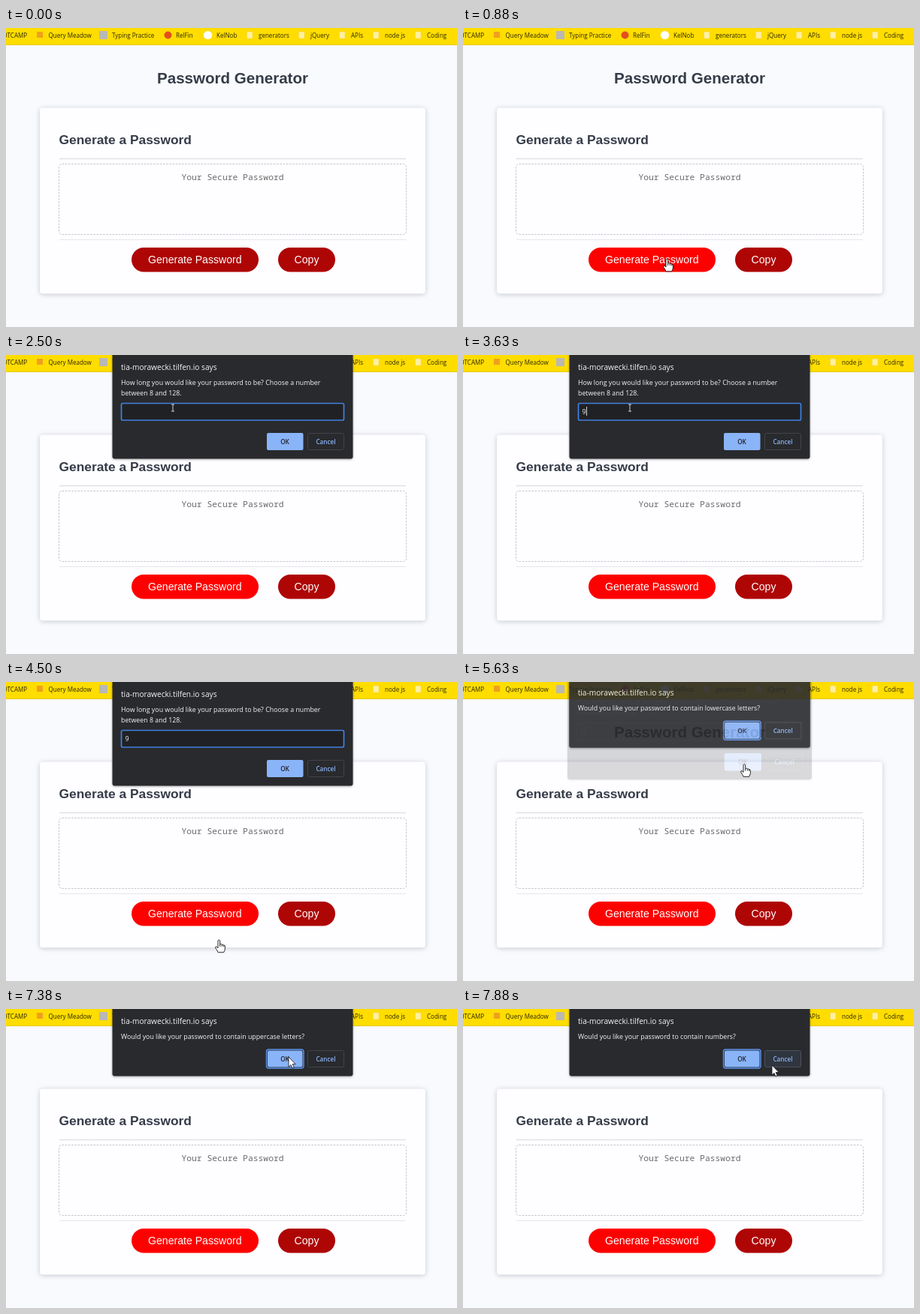
These frames come from a looping animation (600x399 px, 8 s). An HTML page:

```html
<!DOCTYPE html>
<html lang="en">
<head>
<meta charset="utf-8">
<title>Password Generator</title>
<style>
html, body { margin: 0; width: 100%; height: 100%; overflow: hidden; background: #f8fafd; }
svg { display: block; width: 600px; height: 399px; }
text { font-family: "Open Sans", "Noto Sans", sans-serif; white-space: pre; }
.bar text { font-size: 8.05px; fill: #2b2600; }
.page text { font-family: "Liberation Sans", Arial, sans-serif; fill: #353c49; font-weight: bold; }
.page .btn { font-size: 14.1px; font-weight: normal; fill: #fff; text-anchor: middle; }
.page .hint { font: 11.35px "Noto Sans Mono", monospace; fill: #6b6b6b; text-anchor: middle; }
.card { fill: #fefdff; filter: drop-shadow(0 1px 3px rgba(60, 70, 90, .28)); }
.red { fill: #ae0505; }
.red.hover { fill: #fd0000; }
.dialog text { font-size: 8.82px; fill: #f4f5f7; }
.dialog .head { font-size: 10.14px; }
.dialog .ok, .dialog .no { font-size: 8.2px; font-weight: 600; text-anchor: middle; }
.dialog .ok { fill: #202124; }
.dialog .no { fill: #8ab4f8; }
.panel { fill: #292a2d; filter: drop-shadow(0 1px 1.5px rgba(0, 0, 0, .35)); }
.cancel { fill: #292a2d; stroke: #414449; }
.cancel.hover { fill: #30363f; stroke: #4a515c; }
</style>
</head>
<body>
<svg viewBox="0 0 600 399">
  <rect width="600" height="399" fill="#f8fafd"/>
  <g class="bar" id="bar">
    <rect width="600" height="22" fill="#ffdd00"/>
    <rect y="22" width="600" height="1" fill="#e8c81c"/>
    <rect x="41" y="5" width="8" height="8" fill="#f0a01c"/>
    <rect x="124" y="4" width="11" height="11" fill="#b9b8b4"/>
    <circle cx="215.5" cy="9.5" r="5" fill="#e2501f"/>
    <circle cx="268.5" cy="9.5" r="5.6" fill="#fff"/>
  </g>
  <g class="page">
    <text x="301.5" y="74" font-size="20.55" text-anchor="middle">Password Generator</text>
    <rect class="card" x="45" y="106.5" width="513" height="248" rx="4"/>
    <text x="70.5" y="155" font-size="17.35">Generate a Password</text>
    <path d="M71 174.5H532" stroke="#dfe1e8" stroke-width="1.6"/>
    <path d="M71 282.5H532" stroke="#e6e8ee"/>
    <rect x="70.5" y="181.5" width="462" height="94" rx="4" fill="none" stroke="#c2c6d0" stroke-dasharray="2.6 1.6"/>
    <text class="hint" x="301.5" y="203">Your Secure Password</text>
    <rect class="red" id="generate" x="167" y="293" width="169" height="32.5" rx="16.2"/>
    <text class="btn" x="251.3" y="313.5">Generate Password</text>
    <rect class="red" x="362" y="293" width="76" height="32.5" rx="16.2"/>
    <text class="btn" x="400" y="313.5">Copy</text>
  </g>
  <g id="dialogs"></g>
  <g id="cursor" stroke-linejoin="round">
    <path id="arrow" d="M0 0V13.2L3 10.5L5 15L7.2 14L5.2 9.6H9.2Z" fill="#fff" stroke="#111" stroke-width=".8"/>
    <path id="hand" d="M-2 1Q-.6-.8.7 1V6Q2.4 5 3.4 6.6Q5 5.9 5.7 7.2Q7.4 7 7.4 9V12Q7 14.5 5.7 16.8H-1.9Q-3.1 13.8-5.4 10.7Q-5.6 8.6-3.7 9.4L-2 11ZM.7 6V9M3.4 6.6V9M5.7 7.2V9.4" fill="#fff" stroke="#111" stroke-width=".9"/>
    <path id="beam" d="M-2-4.5H2M0-4.5V4.5M-2 4.5H2" fill="none" stroke="#e4e4e4" stroke-width=".9"/>
  </g>
</svg>
<script>
const $ = id => document.getElementById(id);
const clamp = v => Math.max(0, Math.min(1, v));
const LOOP = 8000, STEP = 125, FADE = 200;

// Bookmarks
const labels = [[-16, 'BOOTCAMP'], [56.5, 'Query Meadow'], [141, 'Typing Practice'], [226, 'RelFin'],
  [280, 'KelNob'], [336, 'generators'], [405, 'jQuery'], [459, 'APIs'], [504, 'node js'], [560, 'Coding']];
$('bar').innerHTML += labels.map(([x, name], i) =>
  (i > 4 ? `<rect x="${x - 15.5}" y="5" width="7.5" height="9" rx="1" fill="#fff0a0" stroke="#f3d75c" stroke-width=".6"/>` : '') +
  `<text x="${x}" y="12.5">${name}</text>`).join('');

// Dialogs: each opens at its start time as the previous one closes
const ask = what => [`Would you like your password to contain ${what}?`];
const dialogs = [
  { start: 900, lines: ['How long you would like your password to be? Choose a number', 'between 8 and 128.'], prompt: true },
  { start: 5449, lines: ask('lowercase letters') },
  { start: 6501, lines: ask('uppercase letters') },
  { start: 7480, lines: ask('numbers') }
];
const field = `<rect x="153.5" y="64.5" width="296" height="22.5" rx="2" fill="#202124" stroke="#4080e0" stroke-width="1.7"/>
  <text id="value" x="158.5" y="79">9</text><path id="caret" stroke="#e8eaed" stroke-width=".9"/>`;
const ring = y => `<rect x="346.5" y="${y - 1}" width="49.5" height="25" rx="3" fill="#202b3e" stroke="#5f94e8" stroke-width="1.4"/>`;

$('dialogs').innerHTML = dialogs.map(({ lines, prompt }) => {
  const y = prompt ? 104 : 55;
  return `<g class="dialog">
    <rect class="panel" x="141.5" y="-10" width="320" height="${y + 44.5}" rx="3"/>
    <text class="head" x="153" y="19.8">tia-morawecki.tilfen.io says</text>
    ${lines.map((s, i) => `<text x="153" y="${40 + 14 * i}">${s}</text>`).join('')}
    ${prompt ? field : ring(y)}
    <rect x="${prompt ? 347 : 348}" y="${prompt ? y : y + .5}" width="${prompt ? 48.5 : 46.5}" height="${prompt ? 23 : 22}" rx="2" fill="#8ab4f8"/>
    <text class="ok" x="371" y="${y + 14.5}">OK</text>
    <rect class="cancel" x="401.5" y="${y + .5}" width="48" height="22" rx="2"/>
    <text class="no" x="425.5" y="${y + 14.5}">Cancel</text>
  </g>`;
}).join('');
const groups = [...document.querySelectorAll('.dialog')];
const lastCancel = groups[3].querySelector('.cancel');

// Pointer stops: time, x, y
const stops = [[125, 420, 370], [750, 272, 308], [1250, 272, 308], [1875, 222, 70.5], [4000, 222, 70.5],
  [4500, 284, 344], [4750, 300, 306], [5250, 375, 109.5], [5625, 375, 109.5], [6125, 376, 64],
  [7500, 376, 64], [7875, 411, 75], [8000, 411, 75]];

function pointer(t) {
  const i = Math.max(1, stops.findIndex(s => s[0] > t));
  const [t0, x0, y0] = stops[i - 1], [t1, x1, y1] = stops[i];
  const p = clamp((t - t0) / (t1 - t0)), e = p * p * (3 - 2 * p);
  return [x0 + (x1 - x0) * e, y0 + (y1 - y0) * e];
}

const show = (id, on) => $(id).setAttribute('visibility', on ? 'visible' : 'hidden');

function draw(t) {
  const [x, y] = pointer(t), hover = t >= 625, prompt = t < dialogs[1].start;

  groups.forEach((g, i) => {
    const progress = d => d ? clamp((t - d.start) / FADE) : 0;
    const opening = progress(dialogs[i]), closing = progress(dialogs[i + 1]);
    const a = opening && closing < 1 ? Math.min(opening, 1.05 - closing) : 0;
    const lift = 16 * (1 - opening) + 12 * closing;
    const s = 1 + .018 * (1 - opening + closing);
    g.setAttribute('opacity', a);
    g.setAttribute('display', a ? 'inline' : 'none');
    g.setAttribute('transform', `translate(301.5 ${-lift}) scale(${s}) translate(-301.5 0)`);
  });

  const typed = t >= 3620;
  $('value').setAttribute('display', typed ? 'inline' : 'none');
  $('caret').setAttribute('d', `M${typed ? 164.5 : 159.3} 69V81`);
  const lit = Math.floor((t - (typed ? 3620 : 1000)) / 500) % 2 === 0;
  $('caret').setAttribute('display', lit ? 'inline' : 'none');

  $('generate').classList.toggle('hover', hover);
  lastCancel.classList.toggle('hover', t > dialogs[3].start && x > 401);

  const inside = t >= 1000 && x > 142 && x < 461 && y < (prompt ? 138 : 89);
  const inField = inside && prompt && y > 64 && y < 88 && x < 450;
  const shape = inField ? 'beam' : hover && !inside ? 'hand' : 'arrow';
  for (const id of ['arrow', 'hand', 'beam']) show(id, t >= 125 && id === shape);
  $('cursor').setAttribute('transform', `translate(${x} ${y})`);
}

const begin = performance.now();
function frame() {
  const t = (performance.now() - begin) % LOOP;
  draw(Math.floor(t / STEP) * STEP);
  requestAnimationFrame(frame);
}
frame();
</script>
</body>
</html>
```
